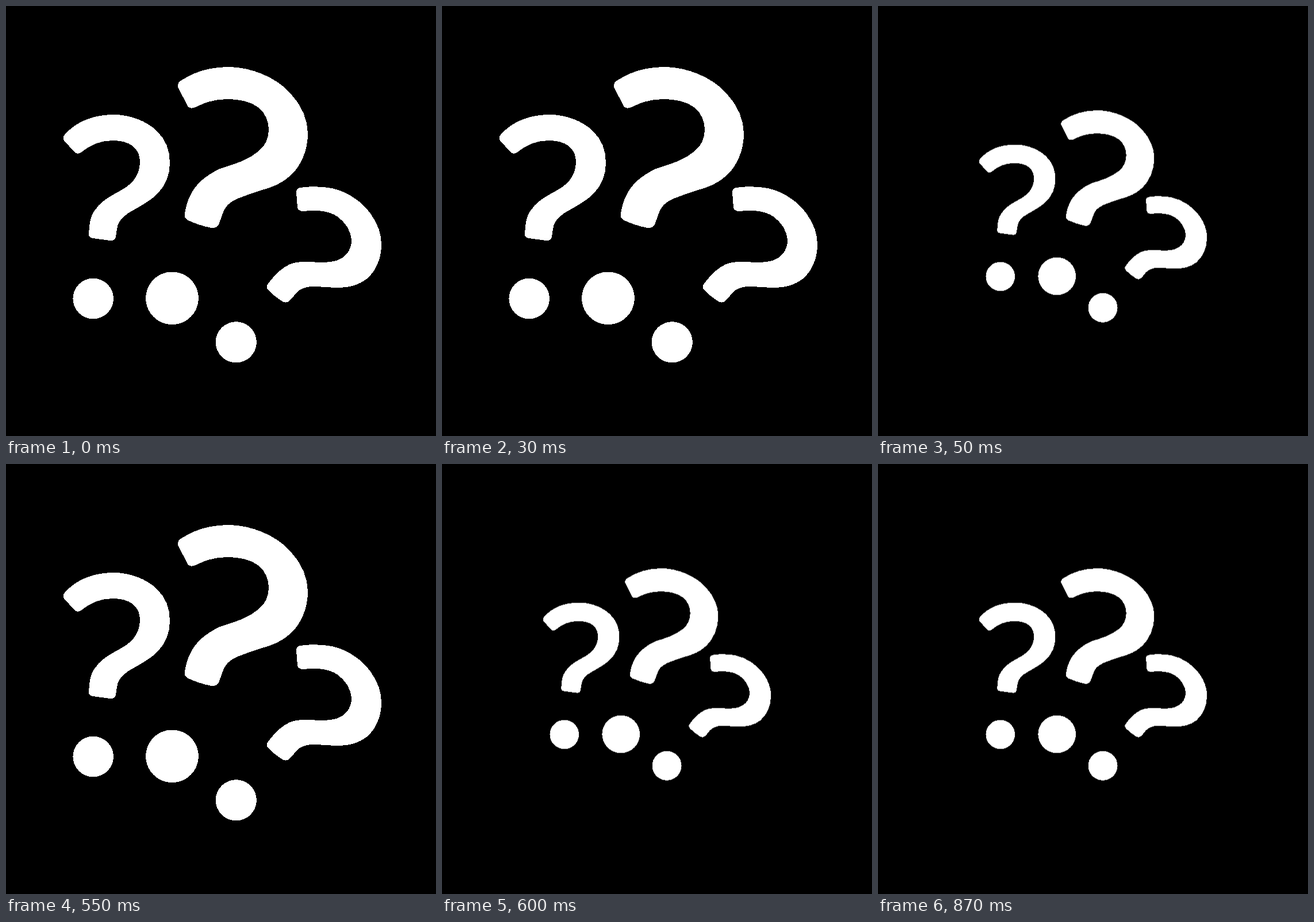
Animation, 748 px wide and 748 px high, one loop 1050 ms. Source, as an HTML page:

```html
<!DOCTYPE html>
<html lang="en">
<head>
<meta charset="utf-8">
<title>Question marks</title>
<style>
  html, body { margin: 0; width: 100%; height: 100%; overflow: hidden; background: #000; }
  svg { display: block; width: 100%; height: 100%; }
  #marks { fill: #fff; shape-rendering: crispEdges; transform-origin: 0 0; }
</style>
</head>
<body>
<svg viewBox="0 0 748 748">
  <g id="marks">
    <!-- left -->
    <path d="M101 234Q98 229 102 224C123 200 153 189 188 189C217 189 246 201 263 218C278 233 285 250 285 273
      C285 294 278 311 265 325C255 336 238 346 220 356C203 365 194 376 193 388L191 402Q189 409 181 408L151 404
      Q144 403 144 397C145 380 146 367 154 356C163 342 176 334 192 325C216 313 233 298 233 271
      C233 248 216 234 186 234C164 234 148 241 130 255Q124 259 119 254Z"/>
    <circle cx="151.7" cy="509" r="35.3"/>
    <!-- middle -->
    <path d="M299 141Q298 134 304 130C328 114 356 106 387 106C426 106 470 124 495 152C515 174 525 198 525 222
      C525 250 514 277 496 294C480 309 462 316 442 321Q421 328 403 335C387 342 380 350 376 364L370 380
      Q366 387 357 386Q337 382 317 373Q309 369 311 360C314 342 320 328 328 317C338 303 352 293 372 283
      C398 275 421 268 439 253C451 243 457 231 457 215C457 200 451 187 440 177C426 166 405 162 386 162
      C364 162 347 167 330 176Q320 180 316 174Z"/>
    <circle cx="289" cy="508.3" r="45.8"/>
    <!-- right -->
    <path d="M505 325Q505 317 512 316C530 313 550 314 567 317C593 323 617 338 634 361C647 379 653 397 653 415
      C653 440 643 462 627 475C613 486 596 490 575 490Q555 489 540 488C525 487 511 491 504 500Q499 507 494 512
      Q488 518 481 514Q468 506 457 495Q451 489 456 483C464 472 474 461 485 454C497 446 508 445 522 445L552 446
      C571 446 584 441 592 432C599 424 601 416 601 406C600 391 590 376 576 366C562 357 543 354 517 357
      Q508 357 507 350Z"/>
    <circle cx="400.3" cy="584.8" r="35.6"/>
  </g>
</svg>
<script>
  const LOOP = 1050;
  const BIG = 'translate(0px, 0px) scale(1)';
  const SMALL = 'translate(104.1px, 105.5px) scale(0.717)';
  const steps = [[0, BIG], [50, SMALL], [550, BIG], [600, SMALL], [LOOP, SMALL]];

  document.getElementById('marks').animate(
    steps.map(([ms, transform]) => ({ offset: ms / LOOP, transform, easing: 'step-end' })),
    { duration: LOOP, iterations: Infinity }
  );
</script>
</body>
</html>
```
